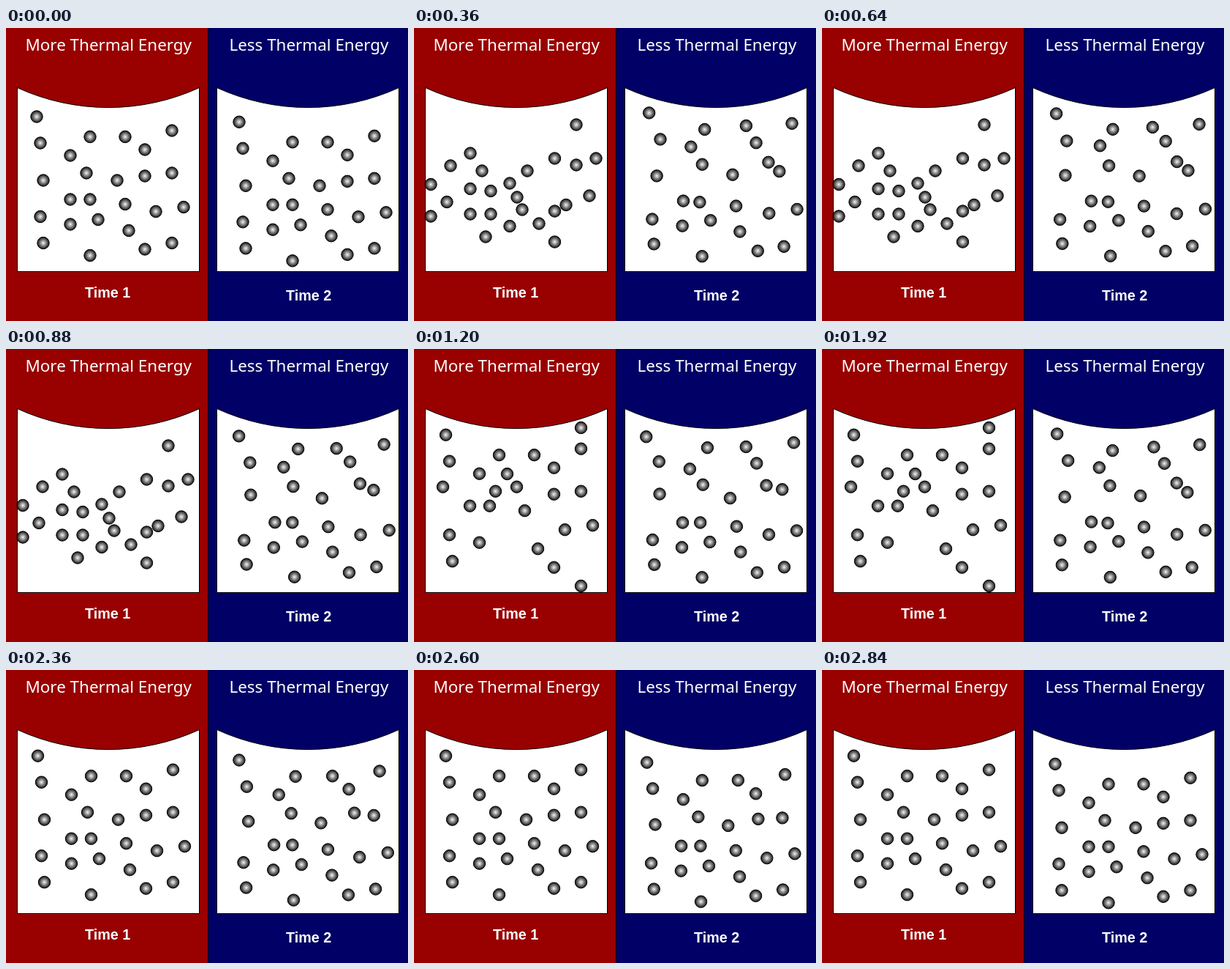
An HTML page for the animation above (2880 ms loop, 550 by 400 pixels).

```html
<!DOCTYPE html>
<html lang="en">
<head>
<meta charset="utf-8">
<title>Thermal energy</title>
<style>
  html, body { margin: 0; width: 100%; height: 100%; overflow: hidden; }
  svg { display: block; width: 550px; height: 400px; }
  text { fill: #fff; }
  .title { font: 22.4px "Noto Sans", "Open Sans", sans-serif; }
  .label { font: bold 19.8px "Liberation Sans", Arial, sans-serif; }
  .jar { fill: #fff; stroke: #000; }
  circle { fill: url(#ball); stroke: #000; }
</style>
</head>
<body>
<svg viewBox="0 0 550 400">
  <defs>
    <radialGradient id="ball">
      <stop offset="0" stop-color="#f4f4f4"/>
      <stop offset="1" stop-color="#111"/>
    </radialGradient>
    <path id="jar" class="jar" d="M.5 81.500A300 300 0 0 0 249.500 81.500V332.500H.5Z"/>
  </defs>
  <rect width="276" height="400" fill="#900"/>
  <rect x="277" width="273" height="400" fill="#006"/>
  <rect x="276" width="1" height="400"/>
  <use href="#jar" x="15"/>
  <use href="#jar" x="288"/>
  <text class="title" x="26.500" y="30.500">More Thermal Energy</text>
  <text class="title" x="305.500" y="30.500">Less Thermal Energy</text>
  <text class="label" x="108" y="368">Time 1</text>
  <text class="label" x="383" y="372">Time 2</text>
  <g id="hot"></g>
  <g id="cold"></g>
</svg>
<script>
const FRAME = 40, FRAMES = 72;

// Balls stand in shared columns: each x has its list of heights.
const layout = columns => Object.entries(columns)
  .flatMap(([x, heights]) => heights.map(y => [+x, y]));
const shift = (pose, dx, dy) => pose.map(([x, y]) => [x + dx, y + dy]);
const random = (i, salt) => {
  const n = Math.sin(i * 12.9898 + salt * 78.233) * 43758.5453;
  return n - Math.floor(n);
};

const spread = layout({
  42: [121], 47: [157, 257.5], 51: [208, 293.5], 88: [174, 234, 268],
  110: [198], 115: [148.5, 234, 310.5], 126: [261.5], 152: [208],
  163: [148.5, 240.5], 168: [276.5], 190: [166, 202, 302],
  205: [250.5], 227: [140, 198, 293.5], 243: [244.5]
});
const gathered = layout({
  23: [213.5, 257], 45: [237.5], 50: [188], 77: [171, 219.5, 254],
  93: [195], 98: [285], 105: [222.5, 254], 131: [212, 270.5],
  141: [231], 148: [248], 155: [195], 171: [267],
  192.5: [178, 250, 292], 208: [241.5], 222: [132, 187],
  240: [229], 249: [178]
});
const raised = shift(spread, 1.5, -3.8);

// The left middle band moves together while three balls fly off.
const strays = { 11: [228.5, 107.5], 12: [127.5, 170.5], 23: [228.5, 323.5] };
const scattered = raised.map(([x, y], i) => {
  const inBand = x < 170 && y > 202 && y < 240;
  return strays[i] || (inBand ? [x - 13, y - 16] : [x, y]);
});
const hotCycle = [scattered, spread, raised, gathered, gathered, raised];
const hotPose = frame => frame ? hotCycle[frame % hotCycle.length] : spread;

// Upper balls drift up and aside, lower ones barely leave their place.
const calm = shift(spread, 277, 7.3);
function coldPose(frame) {
  const away = Math.max(0, Math.min(1, frame / 9, (70 - frame) / 20));
  return calm.map(([x, y], i) => {
    const reach = away * (y < 230 ? 1 : 0.25);
    const sway = 2 * Math.sin(frame / 6 + i);
    return [
      x + reach * (20 * random(i, 1) - 3 + sway),
      y - reach * (10 + 16 * random(i, 2) + sway)
    ];
  });
}

function makeBalls(id) {
  const group = document.getElementById(id);
  return spread.map(() => {
    const ball = document.createElementNS(group.namespaceURI, "circle");
    ball.setAttribute("r", 8.2);
    return group.appendChild(ball);
  });
}

function place(balls, pose) {
  balls.forEach((ball, i) => {
    ball.setAttribute("cx", pose[i][0]);
    ball.setAttribute("cy", pose[i][1]);
  });
}

const hot = makeBalls("hot"), cold = makeBalls("cold");
const began = performance.now();

function draw() {
  const frame = Math.floor((performance.now() - began) / FRAME) % FRAMES;
  place(hot, hotPose(frame));
  place(cold, coldPose(frame));
  requestAnimationFrame(draw);
}
draw();
</script>
</body>
</html>
```
